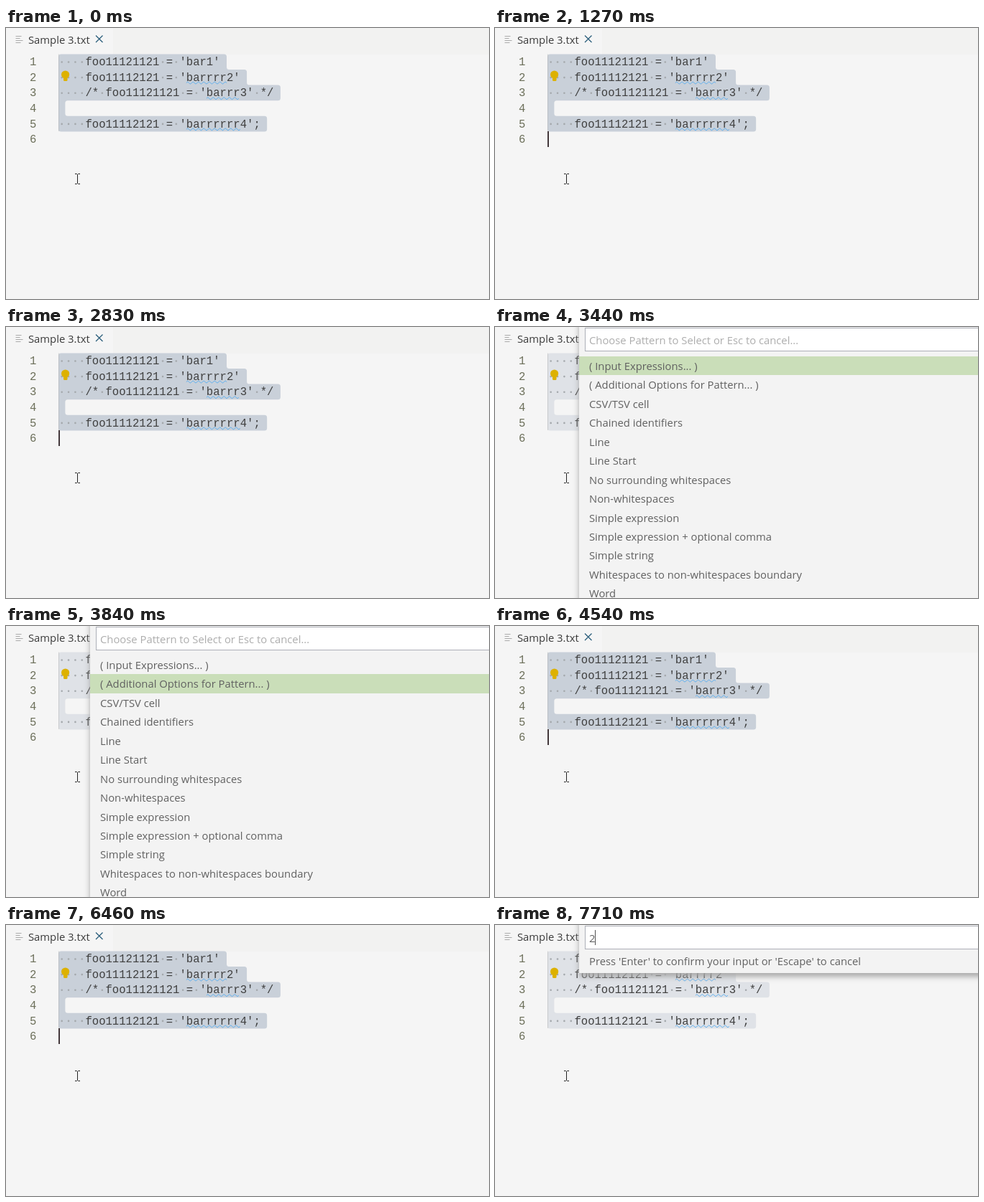
Recreate the animation shown at these times as an HTML page. Size 672x378 px, loop 8 s.

```html
<!DOCTYPE html>
<html lang="en">
<head>
<meta charset="utf-8">
<style>
  html, body { margin: 0; width: 100%; height: 100%; overflow: hidden; background: #f5f5f5; }
  #stage { position: relative; width: 672px; height: 378px; overflow: hidden; font: 14.8px "Open Sans", sans-serif; }
  svg { position: absolute; left: 0; top: 0; }
  svg text { white-space: pre; }
  .code { font: 15.6px "Liberation Mono", monospace; fill: #404040; }
  .code.num { fill: #6d705b; }
  #popup { position: absolute; left: 117px; top: -10px; width: 600px; padding: 51px 0 7.4px;
    background: #f3f3f3; color: #616161; box-shadow: 0 5px 8px #a8a8a8; white-space: nowrap; }
  #field { position: absolute; left: 8px; top: 11px; width: 600px; height: 31px; background: #fff; border: 1px solid #adafb7; }
  #value { position: absolute; left: 14px; top: 15px; line-height: 27px; }
  .empty { color: #adadad; }
  #inputCaret { position: absolute; top: 17px; width: 1px; height: 21px; background: #505050; }
  #rows div { height: 26.45px; line-height: 26.45px; padding-left: 14px; }
  #rows .focus { background: #cadeb9; }
  #rows .message { height: 18.6px; line-height: 19px; }
  b { color: #9769dc; }
</style>
</head>
<body>
<div id="stage">
  <svg width="672" height="378">
    <path d="M149 0H672V37H149z" fill="#f2f2f1"/>
    <path d="M13.5 11.5h8M13.5 14.5h6M13.5 17.5h10M13.5 20.5h7" stroke="#aaa"/>
    <text x="31" y="22" fill="#3b3b3b">Sample 3.txt</text>
    <path d="M125 10.5l9.5 9.5m0-9.5l-9.5 9.5" stroke="#2c5f7c" stroke-width="1.3"/>
    <path id="selection"/>
    <path d="M73.5 36.5V144" stroke="#aaa" stroke-opacity=".45"/>
    <g id="code"></g>
    <path d="M80 68h5.5v4.5q0 1.5-1.5 1.5h-2.5q-1.5 0-1.5-1.5z" fill="#ddb100"/>
    <circle cx="82.6" cy="65" r="5.6" fill="#ddb100"/>
    <rect id="editorCaret" x="73" y="144" width="2" height="22" fill="#43383b"/>
    <path d="M96 203.5h2.5l1 1 1-1h2.5M99.5 204v13M96 217.5h2.5l1-1 1 1h2.5" fill="none" stroke="#222"/>
  </svg>
  <div id="popup">
    <div id="field"></div>
    <div id="value"></div>
    <div id="inputCaret"></div>
    <div id="rows"></div>
  </div>
</div>
<script>
const $ = id => document.getElementById(id);
const LOOP = 8000, LEFT = 73, TOP = 36.4, LINE = 21.6, CHAR = 9.36;
const lineTop = row => TOP + LINE * row;

const lines = [
  "    foo11121121 = 'bar1'",
  "    foo11112121 = 'barrrr2'",
  "    /* foo11121121 = 'barrr3' */",
  "",
  "    foo11112121 = 'barrrrrr4';",
  ""
];

function wave(x, y, width) {
  const steps = Math.round(width / 3.75);
  return `<path d="M${x} ${y}q1.87-3 3.75 0${"t3.75 0".repeat(steps - 1)}" fill="none" stroke="#5fb0ef"/>`;
}

function codeLine(text, row) {
  const mid = lineTop(row + .5);
  const dots = [...text].map((c, i) => c === " "
    ? `<circle cx="${LEFT + CHAR * (i + .5)}" cy="${mid + .3}" r="1.3" fill="#a4a8ac"/>` : "").join("");
  const word = /bar{2,}/.exec(text);
  return `<text class="code num" x="33" y="${mid + 5}">${row + 1}</text>
    <text class="code" x="${LEFT}" y="${mid + 5}">${text}</text>${dots}` +
    (word ? wave(LEFT + CHAR * word.index, mid + 7.8, CHAR * word[0].length) : "");
}

// Outline around the selected lines with every corner rounded
function selectionPath(r) {
  const right = lines.slice(0, 5).flatMap((s, i) => {
    const x = LEFT + CHAR * (s.length + 1);
    return [[x, lineTop(i)], [x, lineTop(i + 1)]];
  });
  const pts = [[LEFT, lineTop(0)], ...right, [LEFT, lineTop(5)]];
  const toward = (a, b) => a.map((v, i) => v + Math.sign(b[i] - v) * r);
  return pts.map((p, i) => {
    const prev = pts.at(i - 1), next = pts[(i + 1) % pts.length];
    return `${i ? "L" : "M"}${toward(p, prev)}Q${p} ${toward(p, next)}`;
  }).join("") + "z";
}

const scopes = ["Matches In Selection", "Matches In Line Selections", "Next Matches From Cursors", "Up To Next Matches From Cursors"];
const patterns = ["CSV/TSV cell", "Chained identifiers", "Line", "Line Start", "No surrounding whitespaces",
  "Non-whitespaces", "Simple expression", "Simple expression + optional comma", "Simple string",
  "Whitespaces to non-whitespaces boundary", "Word", "Word or $word"];
const allPatterns = ["( Input Expressions... )", "( Additional Options for Pattern... )", ...patterns];
const found = ["<b>W</b>ord", "<b>W</b>ord or $word", "<b>W</b>hitespaces to non-whitespaces boundary",
  "No surrounding <b>w</b>hitespaces", "Non-<b>w</b>hitespaces"];

const list = (hint, items, focus, value = "", caret = 14) => ({
  hint, value, caret,
  rows: items.map((s, i) => `<div class="${i === focus ? "focus" : ""}">${s}</div>`).join("")
});
const prompt = (value, caret) => ({
  hint: "Enter match number(s) to select in each line or Esc to cancel...", value, caret,
  rows: `<div class="message">Press 'Enter' to confirm your input or 'Escape' to cancel</div>`
});
const scopeHint = "Choose Select Scope or Esc to cancel...";
const patternHint = "Choose Pattern to Select or Esc to cancel...";

const scenes = [
  [0, null],
  [1480, list(scopeHint, scopes, 0)],
  [2350, list(scopeHint, scopes, 1)],
  [2830, null],
  [2960, list(patternHint, allPatterns, 0)],
  [3840, list(patternHint, allPatterns, 1)],
  [4470, null],
  [4620, list(patternHint, patterns, 0)],
  [5420, list(patternHint, found, 0, "w", 25)],
  [6460, null],
  [6530, prompt("", 14)],
  [7710, prompt("2", 22)]
];
// The caret, wherever the focus is, starts hidden and flips at these times
const blinks = [240, 720, 1270, 1960, 2520, 3440, 3920, 5100, 5420, 5980, 6460, 7080, 7630];

$("code").innerHTML = lines.map(codeLine).join("");
$("selection").setAttribute("d", selectionPath(3.5));

const show = (id, on) => $(id).style.visibility = on ? "visible" : "hidden";
let shown;

function openScene(popup) {
  $("popup").style.display = popup ? "block" : "none";
  $("selection").setAttribute("fill", popup ? "#dfe2e7" : "#c9d0d9");
  if (!popup) return;
  $("value").textContent = popup.value || popup.hint;
  $("value").className = popup.value ? "" : "empty";
  $("inputCaret").style.left = popup.caret + "px";
  $("rows").innerHTML = popup.rows;
}

function draw(now) {
  const t = now % LOOP;
  const scene = scenes.findLast(s => s[0] <= t);
  if (scene !== shown) openScene((shown = scene)[1]);
  const caretOn = blinks.filter(b => b <= t).length % 2 === 1;
  show("editorCaret", caretOn && !scene[1]);
  show("inputCaret", caretOn && scene[1]);
}

const start = performance.now();
function tick() {
  draw(performance.now() - start);
  requestAnimationFrame(tick);
}
tick();
</script>
</body>
</html>
```
